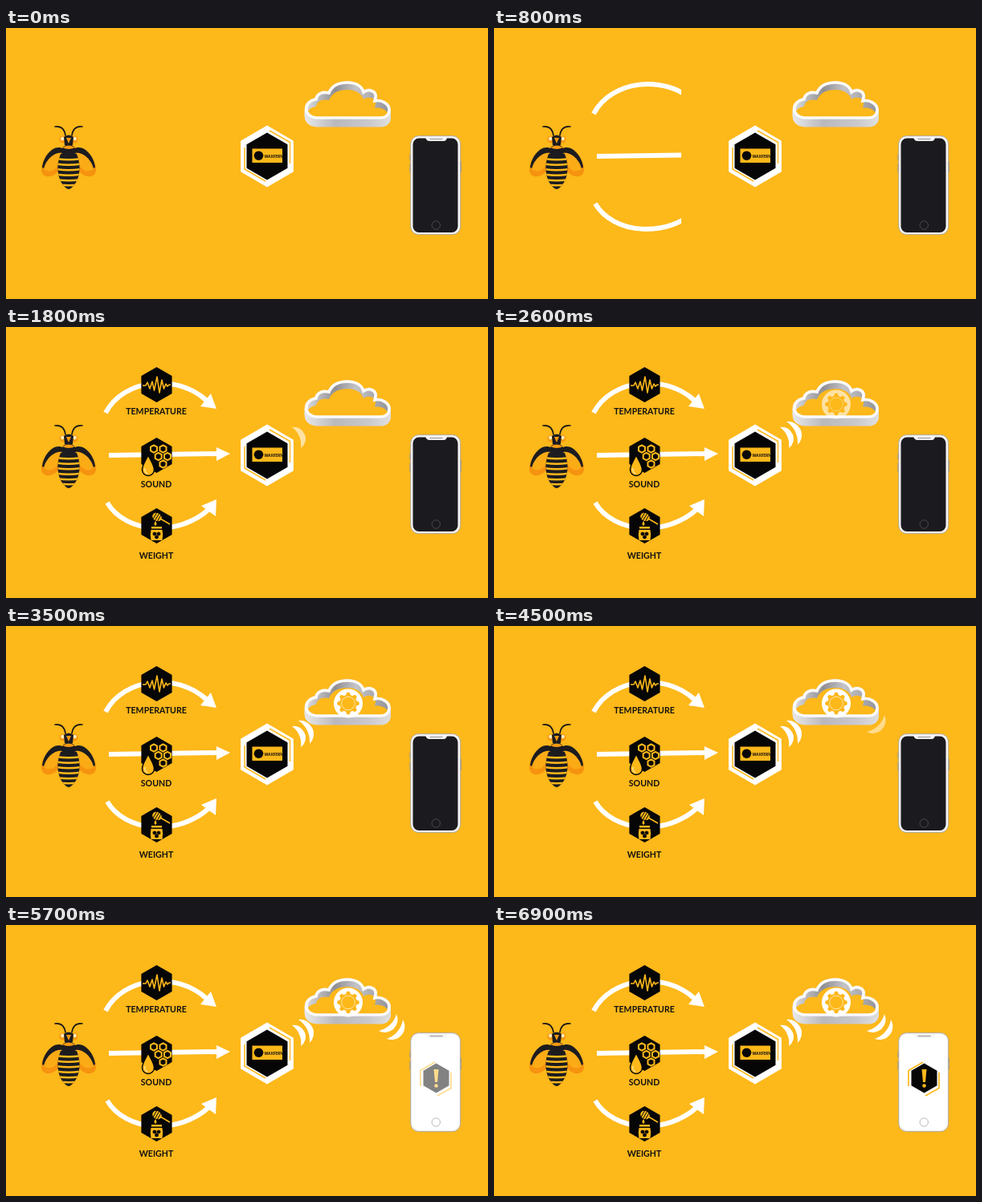
Recreate the animation shown at these times as an HTML page. Size 600 px wide and 338 px high, loop 8000 ms.

```html
<!DOCTYPE html>
<html lang="en">
<head>
<meta charset="utf-8">
<title>Hive monitoring</title>
<style>
  html, body { margin: 0; width: 100%; height: 100%; overflow: hidden; background: #fdb81a; }
  svg { display: block; width: 100%; height: 100%; }
  .label { font: 700 10.6px Lato, "Open Sans", sans-serif; text-anchor: middle; fill: #111; }
  .brand { font: 700 6.2px "Open Sans", sans-serif; fill: #111; }
  .line { fill: none; stroke: #fdb81a; }
</style>
</head>
<body>
<svg viewBox="0 0 600 338">
  <defs>
    <linearGradient id="side">
      <stop offset="0" stop-color="#e6e6e8"/><stop offset=".35" stop-color="#b9b9bd"/>
      <stop offset=".75" stop-color="#c9c9cd"/><stop offset="1" stop-color="#dededf"/>
    </linearGradient>
    <linearGradient id="wall">
      <stop offset="0" stop-color="#dcdcde"/><stop offset=".35" stop-color="#8f8f94"/>
      <stop offset=".6" stop-color="#c4c4c8"/><stop offset="1" stop-color="#939398"/>
    </linearGradient>
    <path id="cloudShape" d="M387 112C369 111 370 91 386 89C387 82 394 79 402 81C406 71 415 68 425 68C436 68 443 73 445 80C452 75 461 79 460 86L459 91C468 89 477 95 477 102C477 109 472 112 466 112Z"/>
    <clipPath id="hole"><use href="#cloudShape"/></clipPath>
  </defs>

  <g id="bee"></g>

  <g id="arrows" fill="none" stroke="#fff" stroke-width="6">
    <path d="M124 107C146 65 212 57 250 92"/>
    <path d="M128 160L264 158"/>
    <path d="M126 219C148 257 215 263 254 226"/>
    <path fill="#fff" stroke="none" d="M262 102L242 99L255 83ZM279 158L262 150V167ZM262 215L243 223L261 236Z"/>
  </g>

  <g id="sensors"></g>
  <g id="badge"></g>
  <g id="cloud"></g>

  <g id="gear"></g>
  <g id="upNear"></g>
  <g id="upFar"></g>
  <g id="downNear"></g>
  <g id="downFar"></g>

  <g id="phone">
    <path d="M503 158V165M503 170V180M566.300 166V180" stroke="#9b9488" stroke-width="1.200"/>
    <rect x="503.700" y="134.600" width="62" height="123" rx="10" fill="#f6f5f5" stroke="#aaa59c" stroke-width=".9"/>
    <rect x="506.500" y="137.500" width="56" height="117.500" rx="7.500" fill="#1b1a1f"/>
    <g id="lit">
      <rect x="505" y="136" width="59" height="120" rx="9" fill="#fff"/>
    </g>
    <path d="M521 136H550C548 137 549 141 545 141H527C523 141 523 137 521 136Z" fill="#f6f5f5"/>
    <path d="M528 138.500H543" stroke="#a9a6a6" stroke-width="1.300" stroke-linecap="round"/>
    <circle cx="535.300" cy="246" r="5.200" fill="none" stroke="#777" stroke-opacity=".5"/>
  </g>
  <g id="alert"></g>
</svg>

<script>
const LOOP = 8000, ORANGE = '#fdb81a', BLACK = '#060606';
const $ = id => document.getElementById(id);

// Pointy-top hexagon
const hex = (x, y, r, attrs, ry = r) => {
  const pts = Array.from({ length: 6 }, (_, i) => {
    const a = i * Math.PI / 3 - Math.PI / 2;
    return `${(x + r * Math.cos(a)).toFixed(1)},${(y + ry * Math.sin(a)).toFixed(1)}`;
  });
  return `<polygon points="${pts.join(' ')}" ${attrs}/>`;
};
const crescent = (x1, y1, x2, y2, outer, inner) =>
  `<path fill="#fff" d="M${x1} ${y1}A${outer} ${outer} 0 0 1 ${x2} ${y2}A${inner} ${inner} 0 0 0 ${x1} ${y1}Z"/>`;
const label = (y, text) => `<text class="label" x="187" y="${y}">${text}</text>`;

// Bee: one half is mirrored about x = 78
const half = `
  <path d="M74 134C73 127 69 122 61 123" fill="none" stroke="#171717" stroke-width="1.700" stroke-linecap="round"/>
  <path d="M71 152C58 147 43 164 44 178C46 190 63 186 68 174Z" fill="#f6930f"/>
  <path d="M72 151C60 143 46 160 45 174C56 179 67 169 72 151Z" fill="#1c1c20"/>
  <path d="M70 156C60 154 49 165 47 176C57 183 66 175 70 156Z" fill="#fbab16"/>
  <circle cx="71" cy="139" r="4.600" fill="#f79a12"/>
  <circle cx="70.500" cy="138" r="2.300" fill="#fff1bd"/>`;
const stripes = [163, 169.5, 176, 182.5, 189, 195].map(y =>
  `<path d="M62 ${y}Q78 ${y + 2.5} 94 ${y}" stroke="${ORANGE}" stroke-width="2.500" fill="none"/>`).join('');
$('bee').innerHTML = `
  ${half}<g transform="matrix(-1 0 0 1 156 0)">${half}</g>
  <path d="M72 136Q78 131 84 136L83 146H73Z" fill="#1c1c20"/>
  <path d="M75 137H81L78 144Z" fill="#f79a12"/>
  <ellipse cx="78" cy="153" rx="9" ry="7.500" fill="#1c1c20"/>
  <path d="M70 149Q78 144 86 149Q78 153 70 149Z" fill="#f79a12"/>
  <clipPath id="body"><path d="M68 157Q78 154 88 157C95 174 91 191 82 199Q78 203 74 199C65 191 61 174 68 157Z"/></clipPath>
  <g clip-path="url(#body)"><rect x="60" y="154" width="36" height="50" fill="#1c1c20"/>${stripes}</g>`;

// Sensor icons
const cells = [[184, 152], [195.5, 152], [189.7, 161.5], [201, 161.5], [195.5, 171]]
  .map(([x, y]) => hex(x, y, 4.6, 'class="line" stroke-width="2"')).join('');
$('sensors').innerHTML = [72, 160, 248].map(y => hex(187.5, y, 22, `fill="${BLACK}"`)).join('') + `
  <path class="line" stroke-width="1.600" stroke-linejoin="round"
    d="M170 73H174L176 69L179 77L182 68L184.500 79L188 62L191 82L194 66L196.500 77L199 71L201 74L203 72H205"/>
  ${cells}
  <path d="M177 160C181 168 184.500 173 184.500 178A7.500 7.500 0 0 1 169.500 178C169.500 173 173 168 177 160Z"
    fill="${ORANGE}" stroke="${BLACK}" stroke-width="1.500"/>
  <path d="M173 176Q172 181 176 183" fill="none" stroke="#ffe7a0" stroke-width="1.400"/>
  <path class="line" stroke-width="1.600" d="M192 239L204 246"/>
  <g transform="rotate(30 188 237)">
    <ellipse cx="188" cy="237" rx="6" ry="5" fill="${ORANGE}"/>
    <path d="M185 231V243M188 231V243M191 231V243" stroke="${BLACK}" stroke-width=".9"/>
  </g>
  <path d="M186 242Q189 246 186 248Q183 246 186 242Z" fill="${ORANGE}"/>
  <path d="M181 249H194V251.500H181ZM180.500 253H194.500Q196 259 194.500 266H180.500Q179 259 180.500 253Z" fill="${ORANGE}"/>
  ${hex(185, 258, 2.6, `fill="${BLACK}"`)}${hex(190, 258, 2.6, `fill="${BLACK}"`)}${hex(187.5, 262, 2.6, `fill="${BLACK}"`)}
  ${label(108.5, 'TEMPERATURE')}${label(199.5, 'SOUND')}${label(288.5, 'WEIGHT')}`;

$('badge').innerHTML = `
  ${hex(325, 160, 38, 'fill="#fff"', 38.5)}
  ${hex(325, 160, 29.5, `fill="${BLACK}"`)}
  <path class="line" stroke-width="1.500" d="M297 149V176L323 191M328 128L353.500 142.500V169"/>
  <rect x="306.500" y="150.500" width="37.500" height="17.500" fill="${ORANGE}"/>
  <circle cx="314.500" cy="159.200" r="5.800" fill="${BLACK}"/>
  <text class="brand" x="321.500" y="161.500" font-stretch="condensed" style="font-size:4.900px">WAXFERN</text>`;

// Extruded cloud ring
const layers = Array.from({ length: 10 }, (_, i) => `<use href="#cloudShape" y="${9.5 - i}"/>`).join('');
$('cloud').innerHTML = `
  <g fill="url(#side)" stroke="url(#side)" stroke-width="4">${layers}</g>
  <use href="#cloudShape" fill="url(#wall)"/>
  <g clip-path="url(#hole)"><use href="#cloudShape" y="9" fill="${ORANGE}"/></g>
  <use href="#cloudShape" fill="none" stroke="#fafafa" stroke-width="3.600"/>`;

const cog = Array.from({ length: 96 }, (_, i) => {
  const a = i * Math.PI / 48;
  const r = 12.2 + 1.5 * Math.tanh(3 * Math.cos(8 * a));
  return `${(426 + r * Math.cos(a)).toFixed(1)},${(96.5 + r * Math.sin(a)).toFixed(1)}`;
}).join(' ');
$('gear').innerHTML = `
  <circle cx="426" cy="96.500" r="18" fill="#fff"/>
  <polygon points="${cog}" fill="${ORANGE}"/>
  <circle cx="426" cy="96.500" r="8.300" fill="none" stroke="#ffe6a6"/>`;

$('upNear').innerHTML = crescent(356, 125, 367, 151, 14.5, 27);
$('upFar').innerHTML = crescent(364, 118, 378, 147, 17, 31);
$('downNear').innerHTML = crescent(486, 111, 464, 132, 16, 29);
$('downFar').innerHTML = crescent(494, 118, 474, 142, 16.5, 30);

$('alert').innerHTML = `
  ${hex(535.5, 191, 18.5, `fill="${BLACK}"`)}
  <path class="line" stroke-width="1.700" d="M516 201V181.500L534 171M554 184V203.500L537 213"/>
  <path d="M532.500 180H538.500L537 196H534Z" fill="${ORANGE}"/>
  <circle cx="535.500" cy="200.500" r="2.300" fill="${ORANGE}"/>`;

const fade = [{ opacity: 0 }, { opacity: 1 }];
const wipe = [{ clipPath: 'inset(-10px 100% -10px -10px)' }, { clipPath: 'inset(-10px -10px -10px -10px)' }];

// id, start ms, end ms, look
const steps = [
  ['arrows', 400, 1000, wipe],
  ['sensors', 1000, 1500, fade],
  ['upNear', 1500, 2000, fade],
  ['upFar', 1900, 2400, fade],
  ['gear', 2300, 2800, fade],
  ['downNear', 4300, 4700, fade],
  ['downFar', 4600, 5000, fade],
  ['lit', 4900, 5500, fade],
  ['alert', 5500, 5900, fade],
];
for (const [id, start, end, [from, to]] of steps) {
  $(id).animate([
    { ...from, offset: 0 },
    { ...from, offset: start / LOOP, easing: `steps(${(end - start) / 100})` },
    { ...to, offset: end / LOOP },
    { ...to, offset: 1 },
  ], { duration: LOOP, iterations: Infinity });
}
</script>
</body>
</html>
```
